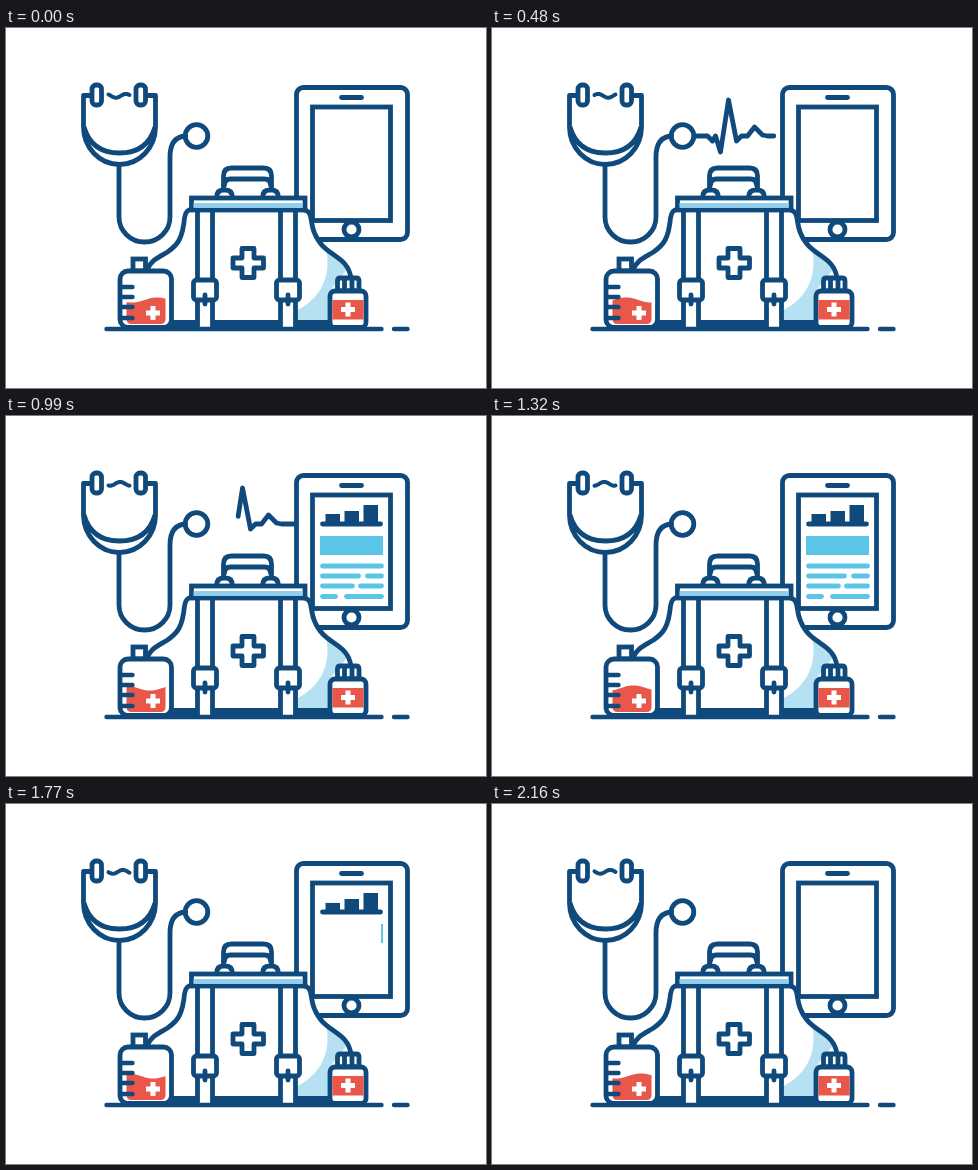
Animation, 480 px wide and 360 px high, one loop 2.19 s. Source, as an HTML page:

```html
<!DOCTYPE html>
<html lang="en">
<head>
<meta charset="utf-8">
<title>Medical kit</title>
<style>
  html, body { margin: 0; width: 100%; height: 100%; overflow: hidden; background: #fff; }
  svg { display: block; width: 480px; height: 360px; }
  .ink { fill: none; stroke: #104a7c; stroke-width: 4.8; stroke-linecap: round; stroke-linejoin: round; }
  .solid { fill: #fff; }
  .navy { fill: #104a7c; stroke: none; }
  .pale { fill: #b5e1f3; stroke: none; }
  .red { fill: #e8574a; stroke: none; }
  .white { fill: #fff; stroke: none; }
  .cyan { stroke: #5bc5e8; }
</style>
</head>
<body>
<svg viewBox="0 0 480 360">
  <defs>
    <path id="plus" d="M-2.500-7h5v4.500h4.500v5h-4.500v4.500h-5v-4.500h-4.500v-5h4.500z"/>
    <g id="strap">
      <path class="solid" stroke="none" d="M-7.5 183h15v116h-15z"/>
      <path d="M-7.5 183V299M7.5 183V299"/>
      <rect class="solid" x="-11.5" y="252" width="23" height="20" rx="3"/>
      <path d="M0 267v9"/>
    </g>
    <path id="foot" class="solid" d="M-8 170q0-8 7-8h2q7 0 7 8"/>
  </defs>

  <g class="ink" transform="translate(-.5 0)">
    <!-- stethoscope -->
    <path stroke-linecap="butt" d="M86 67.500H78V99a36 37.500 0 0 0 72 0V67.500H141M78.500 99Q86 125 114 125Q142 125 149.500 99"/>
    <rect class="solid" x="86.5" y="57" width="9.5" height="20" rx="4"/>
    <rect class="solid" x="130.5" y="57" width="9.5" height="20" rx="4"/>
    <path d="M113.500 137V189a25.500 25 0 0 0 51 0V129Q164.500 109 180 108"/>
    <circle cx="191" cy="108" r="11.300"/>
    <path id="squiggle" stroke-width="4"/>
    <path id="pulse" pathLength="1" d="M205 108H216L221 113L224 108L229 124L237 72L245 113L250 108H256L263 99L271 107L276 108H288"/>

    <!-- tablet -->
    <rect class="solid" x="291" y="59.500" width="111" height="152" rx="7"/>
    <rect x="307" y="79" width="78" height="113.500" stroke-linejoin="miter"/>
    <path d="M336 69.500h20"/>
    <circle cx="346" cy="201.500" r="7.500"/>
    <g id="screen"></g>

    <!-- bag -->
    <path class="white" d="M186 181Q180 182 179 190C177 211 172 217 162 224C152 230 146 232 142 241V300H345V249C342 228 318 230 309 205C304 192 308 184 299 181Z"/>
    <path class="pale" d="M321 223C326 252 312 273 290 283V293H325V262L342 241Z"/>
    <path class="navy" d="M160 292H326V302H160z"/>
    <path class="white" d="M208 284h66v8h-66z"/>
    <path d="M186 181Q180 182 179 190C177 211 172 217 162 224C152 230 146 232 142 241M299 182C308 184 304 194 309 205C318 229 342 226 345.500 250"/>
    <use href="#strap" x="199.500"/>
    <use href="#strap" x="282.500"/>
    <path d="M218 162V148q0-8 8-8h32q8 0 8 8v14M219 157q0-6 6-6h34q6 0 6 6"/>
    <use href="#foot" x="219"/>
    <use href="#foot" x="265"/>
    <rect class="solid" x="186" y="170" width="113.500" height="12" stroke-linejoin="miter"/>
    <path fill="#8fd0ee" stroke="none" d="M188 175h109v4.800h-109z"/>
    <path d="M236.500 220.500h12v9.500h9.500v10h-9.500v9.500h-12v-9.500h-9v-10h9z"/>

    <path d="M101 301H376M388.500 301H402" stroke-width="4.400"/>

    <!-- large bottle -->
    <rect class="solid" x="127.500" y="231" width="12.500" height="12" stroke-linejoin="miter"/>
    <rect class="solid" x="114.500" y="243" width="51.500" height="56.500" rx="8"/>
    <path id="liquid" class="red"/>
    <use href="#plus" class="white" x="147.500" y="285"/>
    <path d="M116 259h11M116 269h11M116 279h11M116 290h11" stroke-width="4.400"/>

    <!-- small bottle -->
    <path class="solid" d="M332 263V253q0-3 3-3h15.500q3 0 3 3v10zM339 251v11M346.500 251v11"/>
    <rect class="solid" x="324.500" y="263" width="36" height="36.500" rx="5"/>
    <path class="red" d="M326.900 272h31.200v19.500h-31.200z"/>
    <use href="#plus" class="white" x="342.500" y="281.500"/>
  </g>
</svg>
<script>
const LOOP = 2190, STEP = 30;
const get = id => document.getElementById(id);
const clamp = v => Math.max(0, Math.min(1, v));
const ease = v => v * v * (3 - 2 * v);
const ramp = (t, from, to) => clamp((t - from) / (to - from));

function add(tag, attrs) {
  const el = document.createElementNS("http://www.w3.org/2000/svg", tag);
  for (const k in attrs) el.setAttribute(k, attrs[k]);
  get("screen").append(el);
  return el;
}

const addLine = (y, x1, x2, cls) =>
  add("path", { d: `M${x1} ${y}H${x2}`, pathLength: 1, class: cls });

// Shows only the part of a path between fractions a and b.
function trim(el, a, b) {
  el.style.visibility = b > a ? "visible" : "hidden";
  el.style.strokeDasharray = `${b - a} 9`;
  el.style.strokeDashoffset = -a;
}

function wave(x1, x2, y, amp, length, crest) {
  const pts = [];
  for (let x = x1; x <= x2; x++)
    pts.push(`${x} ${(y - amp * Math.cos((x - crest) * 2 * Math.PI / length)).toFixed(2)}`);
  return "M" + pts.join("L");
}

const base = addLine(108, 317, 375, "");
const bars = [[320, 10], [339, 13], [358, 19]].map(([x, h]) =>
  ({ h, el: add("rect", { x, width: 14.5, class: "navy" }) }));
const block = add("rect", { y: 120, height: 19, fill: "#5bc5e8", stroke: "none" });
const rows = [
  [150, 317, 376], [160, 317, 353], [160, 362, 376],
  [170, 317, 347], [170, 355, 376], [180.5, 317, 330], [180.5, 341, 376]
].map(([y, x1, x2]) => ({ y, el: addLine(y, x1, x2, "cyan") }));

function draw(t) {
  get("squiggle").setAttribute("d", wave(103, 124, 67.8, 1.9, 20, 107 + 20 * (t / 365 - 0.33)));
  get("liquid").setAttribute("d",
    wave(121, 160, 272, 2.6, 50, 142 + 50 * (t / 730 - 0.808)) +
    "V291Q160 296 155 296H126Q121 296 121 291Z");

  trim(get("pulse"), ramp(t, 825, 1305), ramp(t, 0, 495));
  trim(base, ease(ramp(t, 1895, 2075)), ease(ramp(t, 500, 680)));

  bars.forEach(({ h, el }, i) => {
    const grow = ease(ramp(t, 560 + 50 * i, 720 + 50 * i));
    const shrink = ease(ramp(t, 1740 + 50 * i, 1900 + 50 * i));
    const now = h * (grow - shrink);
    el.setAttribute("y", 108 - now);
    el.setAttribute("height", now);
  });

  const left = 314.5 + 63 * ease(ramp(t, 1600, 1790));
  const right = 314.5 + 63 * ease(ramp(t, 690, 850));
  block.setAttribute("x", left);
  block.setAttribute("width", Math.max(0, right - left));

  rows.forEach(({ y, el }) => {
    const lag = 3 * (y - 150);
    trim(el, ease(ramp(t, 1335 + lag, 1490 + lag)), ease(ramp(t, 770 + lag, 890 + lag)));
  });
}

const start = performance.now();
function tick() {
  const t = (performance.now() - start) % LOOP;
  draw(Math.floor(t / STEP) * STEP);
  requestAnimationFrame(tick);
}
tick();
</script>
</body>
</html>
```
